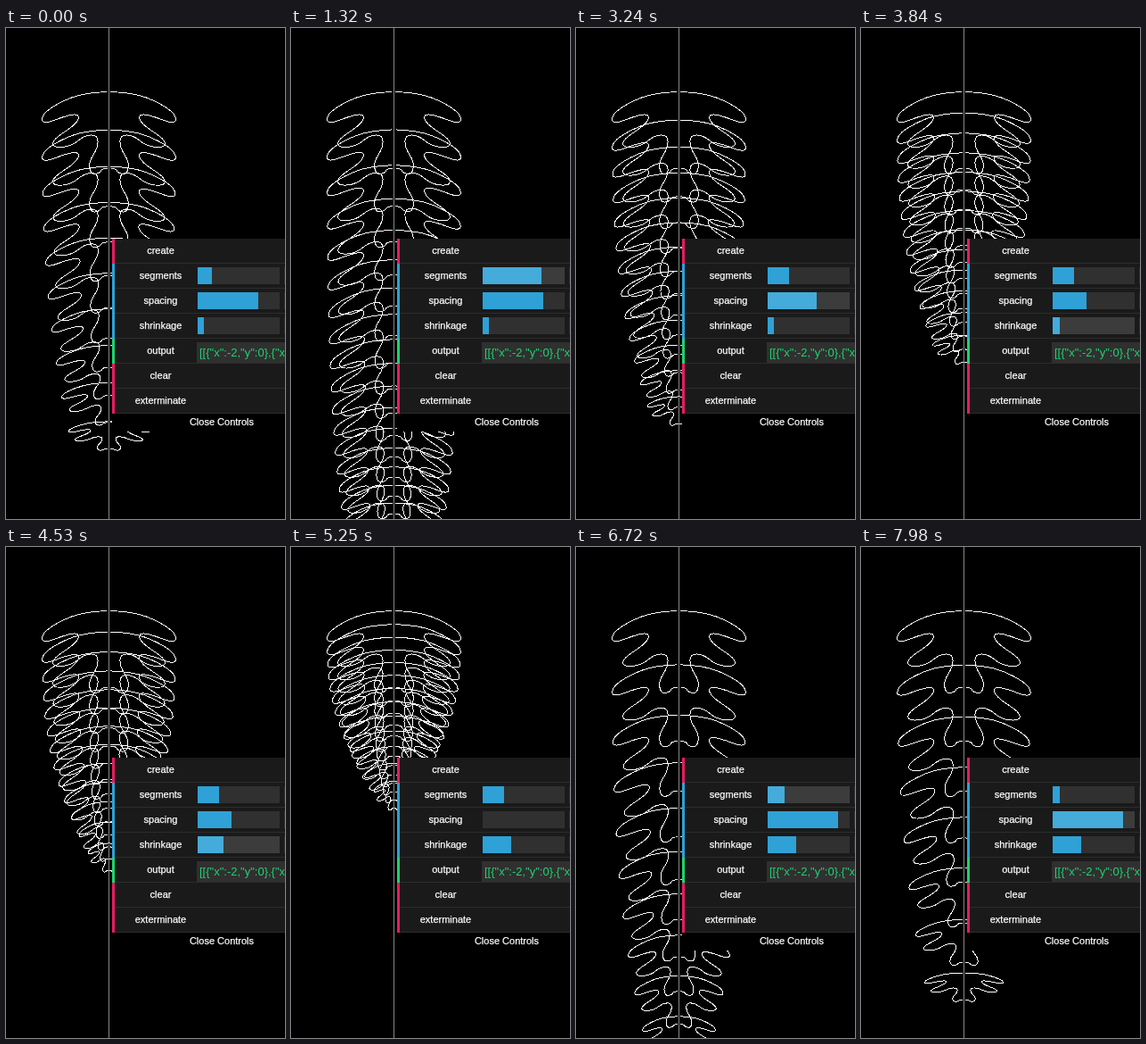
Write an HTML page that moves like this. It is 313 px wide and 550 px high and loops after 8 s.

```html
<!DOCTYPE html>
<html>
<head>
<meta charset="utf-8">
<style>
html, body { margin: 0; width: 100%; height: 100%; overflow: hidden; background: #000; }
svg { display: block; }
text { font: 11px "Liberation Sans", Arial, sans-serif; fill: #fff; stroke: #fff; stroke-width: .25px; text-anchor: middle; }
text.output { font-size: 13px; fill: #1ed36f; stroke: none; text-anchor: start; }
#bones { fill: none; stroke: #fff; shape-rendering: crispEdges; }
</style>
</head>
<body>
<svg width="313" height="550" viewBox="0 0 313 550">
  <path id="bones"/>
  <rect x="115" width="1" height="550" fill="#888"/>
  <g id="panel"></g>
</svg>
<script>
const LOOP = 8000, CENTER = 115.5, TOP = 71;

// Half a bone as a few points: distance from the axis, depth below its top.
const BONE = [
  [2, 0], [28, 1], [56, 12], [75, 25], [75, 37], [46, 26], [33, 25], [36, 36],
  [64, 54], [62, 63], [42, 61], [28, 49], [13, 48], [12, 62],
  [23, 79], [20, 93], [10, 91], [8, 86], [2, 86]
];

// Drags of the slider handles: name, start, end, fill reached in pixels.
const START = { segments: 16, spacing: 68, shrinkage: 7 };
const DRAGS = [
  ['segments', 690, 870, 16], ['segments', 870, 1500, 71], ['segments', 1640, 2460, 24],
  ['spacing', 2490, 2780, 0], ['spacing', 2910, 3240, 55], ['spacing', 3280, 3780, 38],
  ['shrinkage', 3820, 4870, 32],
  ['spacing', 4900, 5200, 0], ['spacing', 5460, 5680, 17], ['spacing', 5700, 6520, 79],
  ['segments', 6600, 7410, 4], ['segments', 7450, 7940, 8], ['spacing', 7950, LOOP, 79]
];

const PINK = '#e61d5f', BLUE = '#2fa1d6', GREEN = '#1ed36f';
const ROWS = [['create', PINK], ['segments', BLUE], ['spacing', BLUE], ['shrinkage', BLUE],
  ['output', GREEN], ['clear', PINK], ['exterminate', PINK]];

const rect = (x, y, w, h, fill, id = '') =>
  `<rect ${id && `id="${id}"`} x="${x}" y="${y}" width="${w}" height="${h}" fill="${fill}"/>`;

function buildPanel() {
  let out = rect(119, 432, 194, 20, '#000');
  ROWS.forEach(([name, color], i) => {
    const y = 236 + i * 28;
    out += rect(119, y, 194, 27, '#1a1a1a') + rect(119, y + 27, 194, 1, '#2c2c2c') +
      rect(119, y, 3, 28, color) + `<text x="173.5" y="${y + 17}">${name}</text>`;
    if (color === BLUE) {
      out += rect(215, y + 4, 92, 19, '#303030', name + 'Track') +
        rect(215, y + 4, 0, 19, BLUE, name) + rect(312, y + 4, 1, 19, '#303030');
    }
    if (color === GREEN) {
      out += rect(214, y + 4, 99, 23, '#303030') +
        `<text class="output" x="217" y="${y + 20}">[[{"x":-2,"y":0},{"x":-14,"y":1}</text>`;
    }
  });
  panel.innerHTML = out + '<text x="242" y="445">Close Controls</text>';
}

function slidersAt(time) {
  const state = { ...START };
  let hover = '';
  for (const [name, start, end, to] of DRAGS) {
    if (time < start) break;
    const p = Math.min(1, (time - start) / (end - start));
    state[name] += (to - state[name]) * Math.sin(p * Math.PI / 2);
    hover = time < end + 40 ? name : '';
  }
  return { state, hover };
}

// Smooth line through midpoints of neighbouring points.
function curve(pts) {
  const end = pts.length - 1;
  let d = 'M' + pts[0];
  for (let i = 1; i < end; i++) {
    const [x, y] = pts[i], [u, v] = pts[i + 1];
    d += `Q${x},${y} ` + (i === end - 1 ? pts[end] : [(x + u) / 2, (y + v) / 2]);
  }
  return d;
}

function spine({ segments, spacing, shrinkage }) {
  const last = Math.floor(4.6 + segments * 0.31);
  const step = 15 / (1 - spacing * 0.0095);
  const decay = 0.941 - shrinkage * 0.0006;
  const narrowing = Math.min(0.7, (0.04 + shrinkage * 0.0006) * last);
  const pivot = 110;
  let d = '', top = TOP;
  for (let i = 0; i <= last && top < 560; i++) {
    const ease = (i / last) ** 2.5;
    const sx = 1 - narrowing * ease, sy = 1 - 0.65 * ease;
    for (const side of [-sx, sx]) {
      d += curve(BONE.map(([x, y]) => [CENTER + side * x, top + pivot + (y - pivot) * sy + 0.5]));
    }
    top += step * decay ** i;
  }
  return d;
}

function draw(now) {
  const { state, hover } = slidersAt(now % LOOP);
  for (const name in state) {
    const bar = document.getElementById(name), on = name === hover;
    bar.setAttribute('width', Math.round(state[name]));
    bar.setAttribute('fill', on ? '#44abda' : BLUE);
    document.getElementById(name + 'Track').setAttribute('fill', on ? '#3c3c3c' : '#303030');
  }
  bones.setAttribute('d', spine(state));
  requestAnimationFrame(draw);
}

const panel = document.getElementById('panel'), bones = document.getElementById('bones');
buildPanel();
draw(0);
</script>
</body>
</html>
```
